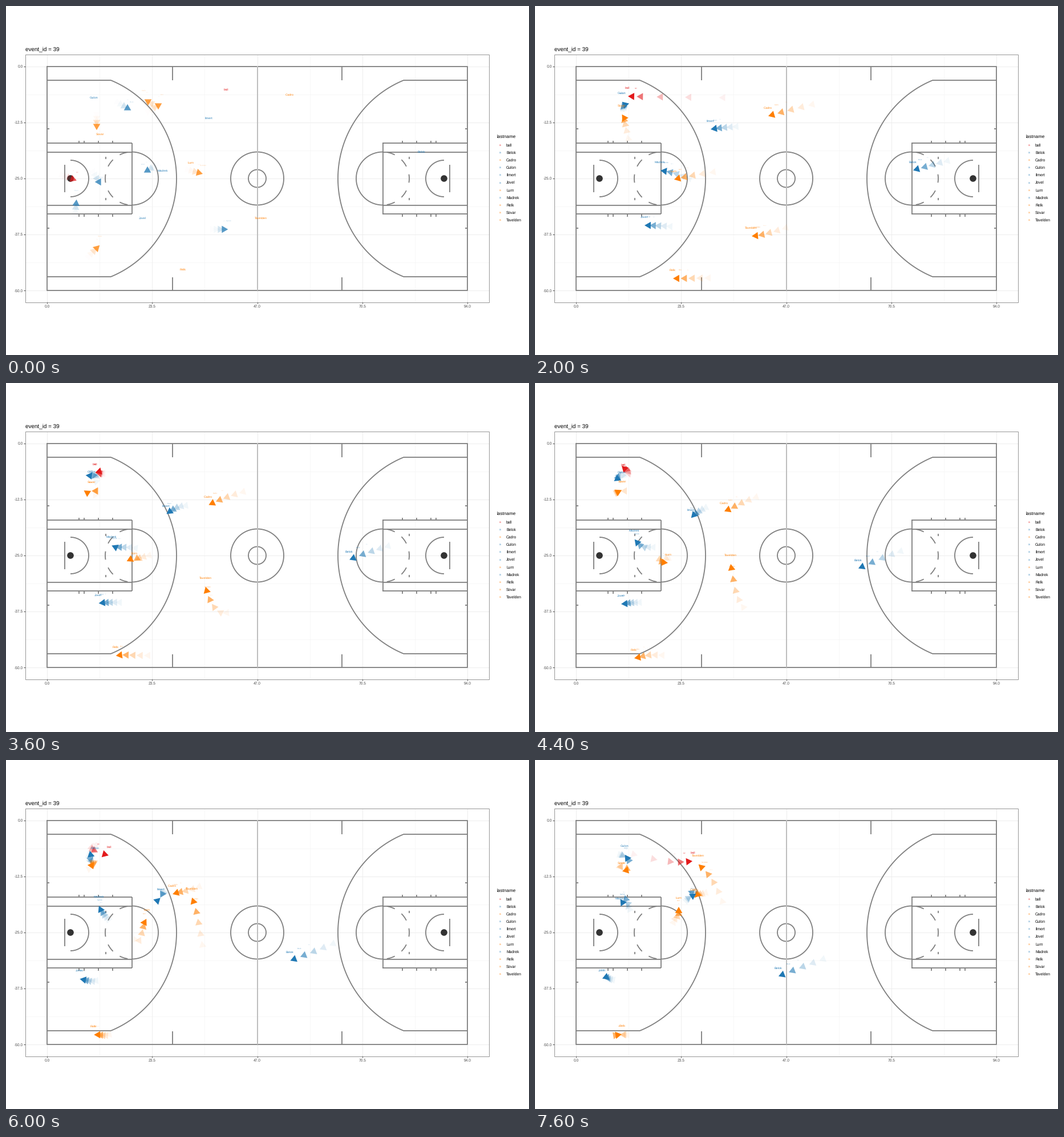
Write a matplotlib script that moves like this. It is 917 px wide and 611 px high and loops after 8 s.

```python
import numpy as np
import matplotlib.pyplot as plt
from matplotlib.animation import FuncAnimation
from matplotlib.collections import PolyCollection
from matplotlib.colors import to_rgba
from matplotlib.patches import Circle, Rectangle

W, H, DPI = 917, 611, 100
FRAMES, INTERVAL = 20, 400
PX = 72 / DPI
BLUE, ORANGE, RED = "#1f78b4", "#ff7f00", "#e31a1c"
LINE = "#7f7f7f"
KEY_STEPS = np.array([0, 5, 8, 11, 14, 17, 19])
WAKE_ALPHA = [1, 0.6, 0.3, 0.14, 0.06]
LABEL_SCALE = [1, 0.55, 0.3]
TRI_RADIUS, TRI_LAG, LABEL_RISE, ENTRY_STEP = 7.3, 8.3, 15, 7

plt.rcParams.update({"font.family": "Liberation Sans", "text.hinting": "none"})
fig = plt.figure(figsize=(W / DPI, H / DPI), dpi=DPI, facecolor="white")
ax = fig.add_axes([0, 0, 1, 1])
ax.set(xlim=(0, W), ylim=(H, 0))
ax.axis("off")


# ---- static chart -------------------------------------------------------
def line(x, y, color=LINE, width=1.8, z=2):
    ax.plot(x, y, color=color, lw=width * PX, zorder=z, solid_capstyle="butt")


def text(x, y, s, size, color="black", ha="left", va="center_baseline", z=6):
    return ax.text(x, y, s, fontsize=size * PX, color=color, ha=ha, va=va, zorder=z)


def arc(x, y, r, start, stop):
    a = np.radians(np.linspace(start, stop, 90))
    line(x + r * np.cos(a), y - r * np.sin(a))


def draw_chart():
    for i in range(5):
        x, y = 72 + 184.25 * i, 105.7 + 98.05 * i
        line([x, x], [85, 518], "#ebebeb", 0.9, 0)
        line([34, 847], [y, y], "#ebebeb", 0.9, 0)
        if i < 4:
            line([x + 92.1] * 2, [85, 518], "#f3f3f3", 0.6, 0)
            line([34, 847], [y + 49] * 2, "#f3f3f3", 0.6, 0)
        line([x, x], [518, 521], "#333333", 0.9)
        line([31, 34], [y, y], "#333333", 0.9)
        text(x, 525.5, f"{23.5 * i:.1f}", 6.7, "#4d4d4d", "center")
        text(30, y, f"{-12.5 * i if i else 0:.1f}", 6.7, "#4d4d4d", "right")
    ax.add_patch(Rectangle((34, 85), 813, 433.5, fill=False, ec="#8c8c8c",
                           lw=0.9 * PX, zorder=7))
    text(34, 79, "event_id = 39", 9.9, va="baseline")


def draw_half(side):
    def fx(x):
        return x if side == 0 else 881 - x

    def seg(x0, y0, x1, y1):
        line([fx(x0), fx(x1)], [y0, y1])

    def sweep(x, r, half_angle):
        mid = 180 * side
        arc(fx(x), 302, r, mid - half_angle, mid + half_angle)

    for s in (-1, 1):
        for x, dy in ((221, 62), (221, 46.5), (184, 172), (76, 87)):
            seg(72, 302 + dy * s, x, 302 + dy * s)
        seg(292, 302 + 196 * s, 292, 302 + 172.5 * s)
        seg(174.5, 302 + 34 * s, 174.5, 302 + 38 * s)
        for x in (127.5, 136.5, 161.5, 186.5):
            seg(x, 302 + 62 * s, x, 302 + 66.5 * s)
    seg(220.5, 240, 220.5, 364)
    seg(103, 278, 103, 325.5)
    sweep(113, 186, np.degrees(np.arcsin(172 / 186)))
    sweep(113, 32, 90)
    sweep(220.5, 46.5, 90)
    for i in range(5):
        a = 99 + 36 * i + 180 * side
        arc(fx(220.5), 302, 46.5, a, a + 18)
    ax.add_patch(Circle((fx(113), 302), 5.8, fc="#333333", lw=0, zorder=3))


draw_chart()
for side in (0, 1):
    draw_half(side)
line([72, 809, 809, 72, 72], [105.7, 105.7, 498, 498, 104.8])
for r in (46.5, 15.5):
    arc(440.5, 302, r, 0, 360)
line([440.5, 440.5], [105, 498], "#bebebe", 2)


# ---- players ------------------------------------------------------------
def glide(t, v, s):
    """Monotone cubic through (t, v), sampled at s."""
    h = np.diff(t)
    d = np.diff(v) / h
    product = d[:-1] * d[1:]
    inner = np.zeros(len(product))
    np.divide(2 * product, d[:-1] + d[1:], out=inner, where=product > 0)
    m = np.r_[(3 * d[0] - inner[0]) / 2, inner, (3 * d[-1] - inner[-1]) / 2]
    i = np.clip(np.searchsorted(t, s, "right") - 1, 0, len(h) - 1)
    u = (s - t[i]) / h[i]
    return ((1 + 2 * u) * (1 - u) ** 2 * v[i] + u * (1 - u) ** 2 * h[i] * m[i]
            + u * u * (3 - 2 * u) * v[i + 1] + u * u * (u - 1) * h[i] * m[i + 1])


class Player:
    """Glides through key points; `entry` is the pose just before step 0."""

    def __init__(self, name, color, entry, *points):
        self.name, self.color, self.entry = name, color, entry
        self.path = np.column_stack([glide(KEY_STEPS, v, np.arange(FRAMES))
                                     for v in np.array(points, float).T])

    def pose(self, k):
        """Tip of the triangle and its unit heading (None at the first step)."""
        if k < 0:
            x, y, deg = self.entry
            a = np.radians(deg)
            heading = np.array([np.cos(a), -np.sin(a)])
            return np.array([x, y]) + heading * (TRI_LAG + ENTRY_STEP * (k + 1)), heading
        if k == 0:
            return self.path[0], None
        d = self.path[k] - self.path[k - 1]
        return self.path[k], d / max(np.hypot(*d), 1e-6)


players = []


def add(*args):
    players.append(Player(*args))


add("ball", RED, (117, 303, -20), (386, 161), (162, 158), (156, 157),
    (155, 158), (162, 162), (245, 179), (277, 177))
add("Belok", BLUE, (213, 179, -30), (728, 270), (662, 288), (618, 303),
    (566, 325), (515, 345), (462, 365), (426, 379))
add("Cadro", ORANGE, (249, 167, 150), (497, 170), (408, 193), (367, 208),
    (331, 225), (298, 233), (282, 239), (279, 242))
add("Gulon", BLUE, (163, 308, -60), (154, 175), (152, 167), (150, 169),
    (152, 171), (154, 168), (161, 171), (157, 165))
add("Ilmert", BLUE, (123, 346, 85), (355, 211), (307, 216), (286, 226),
    (273, 237), (270, 242), (276, 237), (277, 246))
add("Jovel", BLUE, (248, 288, 210), (239, 386), (191, 384), (168, 385),
    (150, 387), (133, 384), (121, 382), (117, 383))
add("Lurn", ORANGE, (267, 174, 30), (324, 289), (243, 304), (223, 312),
    (234, 315), (243, 284), (252, 266), (252, 256))
add("Madrek", BLUE, (382, 391, 0), (275, 303), (219, 288), (191, 287),
    (174, 273), (165, 260), (157, 246), (150, 257))
add("Relk", ORANGE, (159, 210, -90), (310, 476), (241, 477), (203, 476),
    (173, 482), (158, 481), (147, 481), (153, 480))
add("Sovar", ORANGE, (159, 424, 45), (165, 239), (152, 189), (149, 189),
    (153, 187), (153, 191), (155, 194), (152, 195))
add("Tavelden", ORANGE, (338, 292, -15), (447, 386), (379, 403), (354, 372),
    (343, 316), (332, 258), (309, 207), (286, 182))

# ---- legend -------------------------------------------------------------
text(860, 228, "lastname", 8.3)
for i, p in enumerate(players):
    y = 243 + 13.15 * i
    text(866.5, y, "a", 5, to_rgba(p.color, 0.85), "center")
    text(877, y, p.name, 6.8)

# ---- animation ----------------------------------------------------------
triangles = PolyCollection([], linewidths=0, zorder=4)
ax.add_collection(triangles)
labels = [[text(0, 0, p.name, 5.5 * scale, p.color, "center", z=5.5 - 0.1 * age)
           for p in players] for age, scale in enumerate(LABEL_SCALE)]
CORNERS = np.radians([0, 120, 240])


def triangle(tip, heading):
    a = np.arctan2(heading[1], heading[0]) + CORNERS
    center = tip - TRI_LAG * heading
    return center + TRI_RADIUS * np.column_stack([np.cos(a), np.sin(a)])


def update(frame):
    verts, colors = [], []
    for age in reversed(range(len(WAKE_ALPHA))):
        k = frame - age
        alpha = WAKE_ALPHA[age] * (1.25 * 0.5 ** (-1 - k) if k < 0 else 1)
        for i, p in enumerate(players):
            tip, heading = p.pose(k)
            if heading is not None:
                verts.append(triangle(tip, heading))
                colors.append(to_rgba(p.color, alpha))
            if age < len(LABEL_SCALE):
                labels[age][i].set_position((tip[0], tip[1] - LABEL_RISE))
                labels[age][i].set_alpha(WAKE_ALPHA[age] * (0.5 if k < 0 else 0.95))
    triangles.set_verts(verts)
    triangles.set_facecolor(colors)
    return [triangles]


anim = FuncAnimation(fig, update, frames=FRAMES, interval=INTERVAL,
                     init_func=lambda: update(0), repeat=True, repeat_delay=0,
                     blit=False)
plt.show()
```
